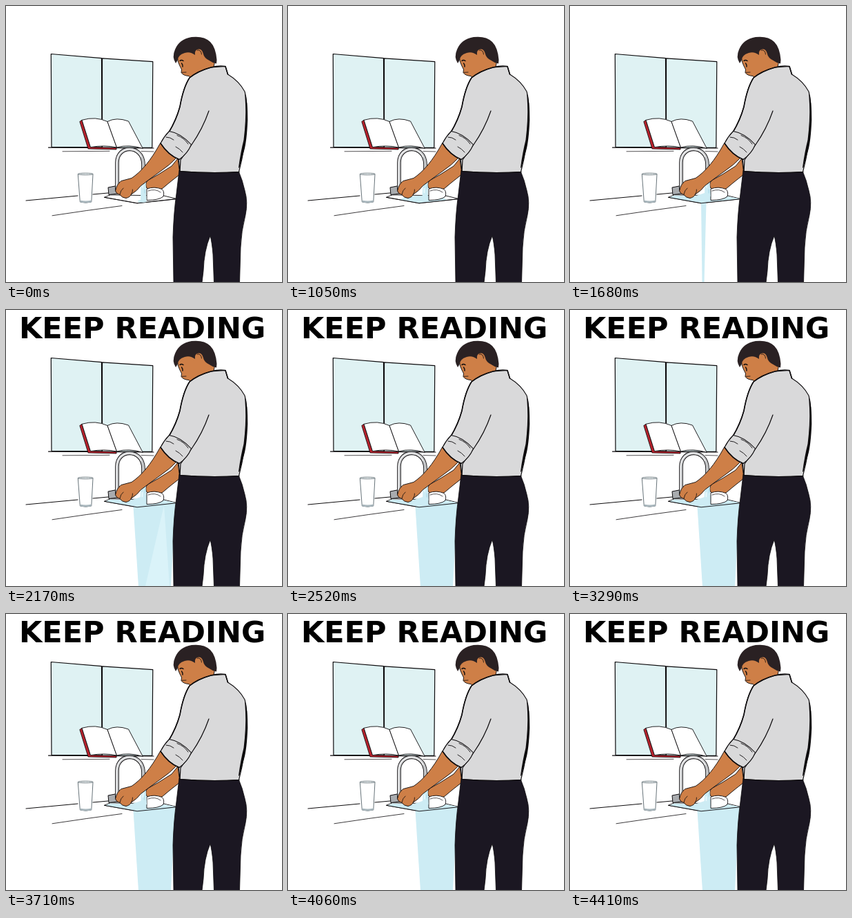
Animation of 400 by 400 pixels, one loop 4480 ms. Source, as an HTML page:

```html
<!DOCTYPE html>
<html lang="en">
<head>
<meta charset="utf-8">
<title>Keep reading</title>
<style>
  html, body { margin: 0; width: 100%; height: 100%; overflow: hidden; background: #fff; }
  svg { display: block; width: 100vw; height: 100vh; }
  #title { font: bold 43px "DejaVu Sans", Inter, sans-serif; fill: #000; }
  .ink { fill: none; stroke: #0c0a0c; stroke-linecap: round; stroke-linejoin: round; }
  .skin { fill: #ce7f47; stroke: #0c0a0c; stroke-width: .9; stroke-linejoin: round; }
  .shirt { fill: #d9d9da; stroke: #0c0a0c; stroke-width: 1.1; stroke-linejoin: round; }
  .pane { fill: #dff2f3; stroke: #0c0a0c; stroke-width: 1.2; stroke-linejoin: round; }
  .page { fill: #fff; stroke: #0c0a0c; stroke-width: .9; stroke-linejoin: round; }
  .dark { fill: #1b1722; }
  .hair { fill: #2a2123; }
  .water { fill: #cdecf4; }
</style>
</head>
<body>
<svg viewBox="0 0 400 400">
  <defs>
    <clipPath id="basin"><path d="M144 277.5L151 274.500L180 276L204 268L229 276L247.500 279.500L190 285.200Z"/></clipPath>
  </defs>

  <!-- window and sill -->
  <path class="pane" d="M65.300 69.500L138.500 75.700L139 204.800L66 204.300Z"/>
  <path class="pane" d="M139.500 75.800L212.800 80.700L211.800 205.300L139.500 205Z"/>
  <path class="ink" stroke-width="1.200" d="M61.500 205.100L214 206"/>
  <path class="ink" stroke-width=".7" d="M82 210.800L150 210.300M196 210.600L214 211"/>

  <!-- book -->
  <path d="M106.800 167.500L110 165.300L122.500 204.500L160 205.500V208L119 207Z" fill="#b8222c" stroke="#0c0a0c" stroke-width=".8"/>
  <path class="page" d="M110 165.300Q130 159.500 147 167.500L160.500 205Q142 201 122.500 204.700Z"/>
  <path class="page" d="M147 167.500Q160 160.500 177.500 167L198.300 206.500Q178 200 160.500 205Z"/>

  <!-- counter -->
  <path class="ink" stroke="#333" stroke-width="1" d="M29 282L104 275M126 273L150 270.800"/>
  <path class="ink" stroke-width=".8" d="M67 303.800Q115 296.500 168 289.500"/>

  <!-- glass -->
  <path d="M104.300 243.500L107.300 284Q115.500 286.500 123.800 284L126 243.500Z" fill="#fff" stroke="#68747a" stroke-width="1"/>
  <ellipse cx="115.200" cy="243.500" rx="10.900" ry="1.300" fill="#eef3f4" stroke="#68747a" stroke-width=".9"/>
  <path d="M107.200 281.500L107.500 284Q115.500 286.500 123.600 284L123.900 281.500Q115.500 283.500 107.200 281.500Z" fill="#a9b7bd"/>

  <!-- sink -->
  <path class="page" d="M142.500 277.300L151 273.800L229 275L247.500 279.500L190 285.800Z"/>
  <path id="fall" class="water"/>
  <path id="sheet" fill="#daf3f9" d="M229 283L202 400H237Z"/>
  <g clip-path="url(#basin)"><ellipse id="pool" class="water" cx="196"/></g>
  <path class="ink" stroke-width=".9" d="M142.500 277.300L190 285.800L247.500 279.700"/>

  <!-- tap -->
  <path d="M148 263L158 261L162 264V272L149 273.500Z" fill="#a9acaf" stroke="#0c0a0c" stroke-width="1"/>
  <path class="ink" stroke-width="5.600" stroke-linecap="butt" d="M161 266V227C161 200.500 198 200.500 199 229V236"/>
  <path d="M161 265V227C161 200.500 198 200.500 199 229V236" fill="none" stroke="#c3c5c7" stroke-width="3.900"/>
  <path d="M160.300 262V227C161 203.500 190 202.500 196 219" fill="none" stroke="#f3f3f3" stroke-width="1.300"/>

  <!-- far arm and dish -->
  <path class="skin" d="M249 221L240 232L221 244L205 253Q201 258 204 264L213 268L226 265L238 255L252 244Z"/>
  <path class="page" d="M204 265Q215 261 226 265.500Q230 269 228 276Q222 281.500 204 281.500Z"/>
  <path class="ink" stroke-width=".7" d="M206 268Q216 264 224 270"/>

  <!-- running water -->
  <path id="stream" class="water"/>
  <path id="glint" fill="none" stroke="#eefafd" stroke-width="1.600" stroke-linecap="round"/>
  <path id="shade" fill="none" stroke="#aedcea" stroke-width="1.200" stroke-linecap="round"/>

  <!-- near arm -->
  <path class="skin" d="M223.500 199Q213 218 203 230Q192 243 182 249.500L167 253.500Q160.500 258 158.500 268Q160 272.500 165 273.500Q168 278 174 278.500Q180 277 181.500 273Q190 268 195.500 260.500Q211 248.500 224 239.500Q238 230 247 220Z"/>
  <path class="ink" stroke-width=".8" d="M165 273Q166 267 170 264M181.500 273Q184 269 183.500 266"/>

  <!-- trousers -->
  <path class="dark" stroke="#0c0a0c" stroke-width=".8" d="M251 238L337 239Q343 253 346 267Q351 284 347 303Q341 326 340 350L338.500 401H301.500L300 360Q298.500 342 296 333Q287 354 286 384L284 401H243L242 335Q243 300 247 272Z"/>

  <!-- head -->
  <path class="skin" d="M250 66Q246.500 76 251.500 86L254.500 92L254 96.500Q257 101 265 101.500L268 104L285 98L301 89L303 78L289 62L262 58Z"/>
  <path class="hair" d="M246 83Q240 74 245 63Q251 48 269 45Q287 43 296 52Q304 60 305.500 78L305 83.500Q300 83 295.500 79.500Q287 76 285.500 68Q283 61 277 63Q273 65 274 71Q267 65.500 259 68Q249 71 248.500 79Z"/>
  <path class="ink" stroke-width=".8" d="M277 64Q283 63 283.500 70M255 96.300L261 96"/>
  <path class="ink" stroke-width="1.400" d="M252 79.500Q254 77.500 257 79.500M254.500 83Q256.500 85 256 88"/>

  <!-- shirt -->
  <path class="shirt" d="M297 89L318 87.500L321.500 99Q338 109 346 124Q350 138 349 165Q347 205 337.500 240.500Q295 243 252 239.500L250 221L236 183Q246 166 252 146Q257 117 266 104Q280 94 297 89Z"/>
  <path fill="#0c0a0c" d="M346 124Q350.500 138 350.300 165Q349 196 345 210L338 235L337 234Q340 212 344.500 194Q348 165 347 142Z"/>
  <path class="ink" stroke-width="1.600" d="M236 183Q247 165 252 146Q257 118 266 104Q278 94 297 89M297 89Q308 86 318 87.500L321.500 99"/>
  <path class="ink" stroke-width="1.200" d="M294 152Q285 178 269 201L253 223L252 240"/>
  <path class="shirt" d="M236.500 181.500Q253 184 268.500 201Q263 214 251 222.500Q235 216 224 199Q229 189 236.500 181.500Z"/>
  <path class="ink" stroke-width=".9" d="M232 190Q238 190 243 194M248 187.500Q258 191 264 200M246 204Q252 207 256 212"/>
  <path class="ink" stroke-width="1.500" d="M224 199Q235 216 251 222.500"/>
  <path class="ink" stroke-width="1.100" d="M252 239.500Q295 243 338 240.500"/>

  <text id="title" x="19" y="40.500">KEEP READING</text>
</svg>
<script>
const STEP = 70, COUNT = 64, TITLE_START = 28, BLINK = 5;
const get = id => document.getElementById(id);
const [title, fall, sheet, pool, stream, glint, shade] =
  ['title', 'fall', 'sheet', 'pool', 'stream', 'glint', 'shade'].map(get);

// Piecewise linear value from [step, value] stops
function ramp(n, stops) {
  if (n <= stops[0][0]) return stops[0][1];
  for (let i = 1; i < stops.length; i++) {
    const [a, u] = stops[i - 1], [b, v] = stops[i];
    if (n <= b) return u + (v - u) * (n - a) / (b - a);
  }
  return stops[stops.length - 1][1];
}

function drawStream(n) {
  const sway = Math.sin(n * Math.PI / 2) * .6;
  const end = ramp(n, [[8, 284], [17, 281], [24, 276]]);
  stream.setAttribute('d',
    `M195.500 254H202.500L${203.500 + sway} ${end}Q199 ${end + 1.5} ${195 + sway} ${end}Z`);
  const y = 257 + n % 4 * 2.5;
  glint.setAttribute('d', `M${198 + sway} ${y}v6`);
  shade.setAttribute('d', `M${201 - sway} ${266 - n % 4 * 2}v5`);
}

function drawPool(n) {
  pool.setAttribute('cy', ramp(n, [[8, 283], [24, 279]]));
  pool.setAttribute('rx', ramp(n, [[0, 5], [8, 9], [16, 37], [24, 58]]));
  pool.setAttribute('ry', ramp(n, [[0, 2], [8, 2.5], [16, 7], [24, 13]]));
}

function drawFall(n) {
  sheet.setAttribute('opacity', n < 28 ? 0 : ramp(n, [[31, 1], [32, 0]]));
  if (n < 20) return fall.setAttribute('d', '');
  const foot = ramp(n, [[19, 286], [24, 401]]);
  const wide = ramp(n, [[24, 0], [31, 1]]);
  const mix = (a, b) => a + (b - a) * wide;
  fall.setAttribute('d', `M${mix(190, 184.5)} 285L${mix(197.5, 245.5)} ${mix(285, 280)}` +
    `L${mix(194.5, 239)} ${foot}H${mix(191.5, 192)}Z`);
}

function drawTitle(n) {
  const shown = n >= TITLE_START && n % BLINK > 0;
  title.setAttribute('visibility', shown ? 'visible' : 'hidden');
}

function frame() {
  const n = Math.floor(performance.now() / STEP) % COUNT;
  [drawStream, drawPool, drawFall, drawTitle].forEach(draw => draw(n));
  requestAnimationFrame(frame);
}
frame();
</script>
</body>
</html>
```
